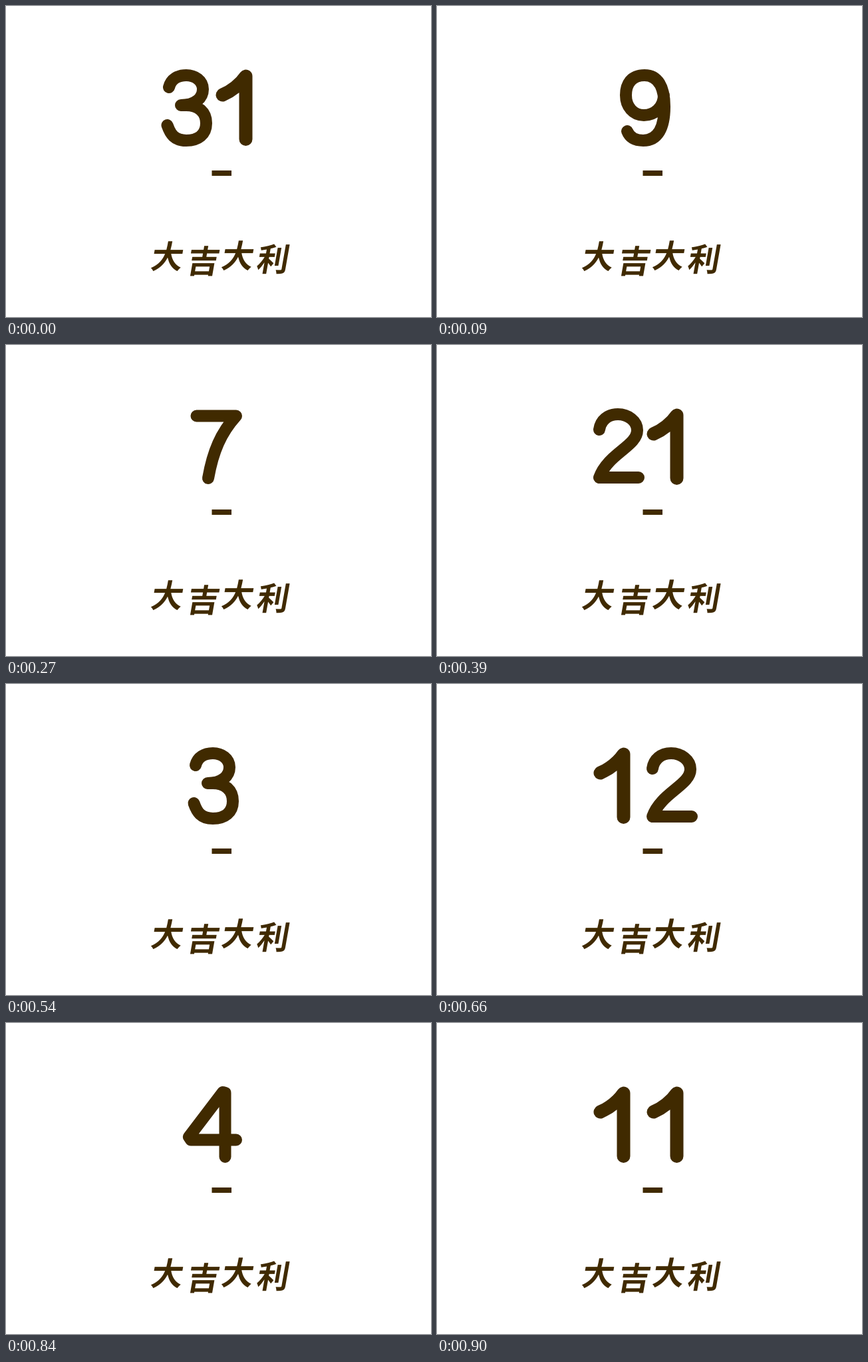
These frames come from a looping animation (639 px wide and 467 px high, 0.93 s). An HTML page:

```html
<!DOCTYPE html>
<html lang="zh-CN">
<head>
<meta charset="utf-8">
<title>大吉大利</title>
<style>
  html, body { margin: 0; width: 100%; height: 100%; overflow: hidden; background: #fff; }
  svg { display: block; fill: #402a00; }
  .digit { fill: none; stroke: #402a00; stroke-width: 18; stroke-linecap: round; stroke-linejoin: round; }
  text { font: 900 48px "Noto Sans CJK SC", "Noto Sans CJK", sans-serif; }
</style>
</head>
<body>
<svg width="639" height="467" viewBox="0 0 639 467">
  <defs>
    <ellipse id="d0" cx="39.5" cy="153" rx="29" ry="48.5"/>
    <path id="d1" stroke-width="20" d="M12.5 133.5C25 128 38 119 47.5 105.5V200"/>
    <path id="d2" d="M11 127C13 113 24 104 39 104S68 114 68 128C68 152 24 163 11 199H70"/>
    <path id="d3" d="M12 122C15 110 25 104 38 104S63 112 63 125S52 149 30 149H38C56 149 68 159 68 176S56 202 38 202S14 192 9.5 179"/>
    <path id="d4" d="M56.5 201V105L53 104L2 171L5 175.500H73"/>
    <path id="d5" d="M64 106H19L13 147C20 142 28 139 39 139C57 139 68 152 68 170S56 202 38 202S14 193 10 182"/>
    <path id="d6" d="M66 118C62 108 53 104 42 104C20 104 10 123 10 155C10 185 20 202 40 202S68 189 68 172S57 142 41 142S11 154 11 172"/>
    <path id="d7" d="M13.500 106.500H73C50 132 38 160 31 200"/>
    <g id="d8">
      <ellipse cx="39.5" cy="125.5" rx="25" ry="21"/>
      <ellipse cx="39.5" cy="175.5" rx="29" ry="26"/>
    </g>
    <use id="d9" href="#d6" transform="rotate(180 39.5 153)"/>
  </defs>

  <g class="digit">
    <use id="tens" x="233"/>
    <use id="ones"/>
  </g>
  <rect x="309.5" y="247" width="29.5" height="8"/>

  <text transform="translate(216 394) skewX(-10)">大</text>
  <text transform="translate(270 401) skewX(-10)">吉</text>
  <text transform="translate(322 393) skewX(-10)">大</text>
  <text transform="translate(375 398) skewX(-10)">利</text>
</svg>
<script>
  const days = [31, 17, 26, 9, 20, 14, 30, 5, 24, 7, 18, 27, 2, 21, 13, 8,
                29, 16, 3, 25, 6, 19, 12, 28, 10, 1, 22, 15, 4, 23, 11];
  const step = 30;
  const tens = document.getElementById('tens');
  const ones = document.getElementById('ones');
  let shown = 0;

  function show(day) {
    if (day === shown) return;
    shown = day;
    const two = day > 9;
    tens.style.display = two ? '' : 'none';
    if (two) tens.setAttribute('href', '#d' + Math.floor(day / 10));
    ones.setAttribute('href', '#d' + day % 10);
    ones.setAttribute('x', two ? 313 : 273);
  }

  const start = performance.now();
  function tick() {
    const t = performance.now() - start;
    show(days[Math.floor(t / step) % days.length]);
    requestAnimationFrame(tick);
  }
  tick();
</script>
</body>
</html>
```
